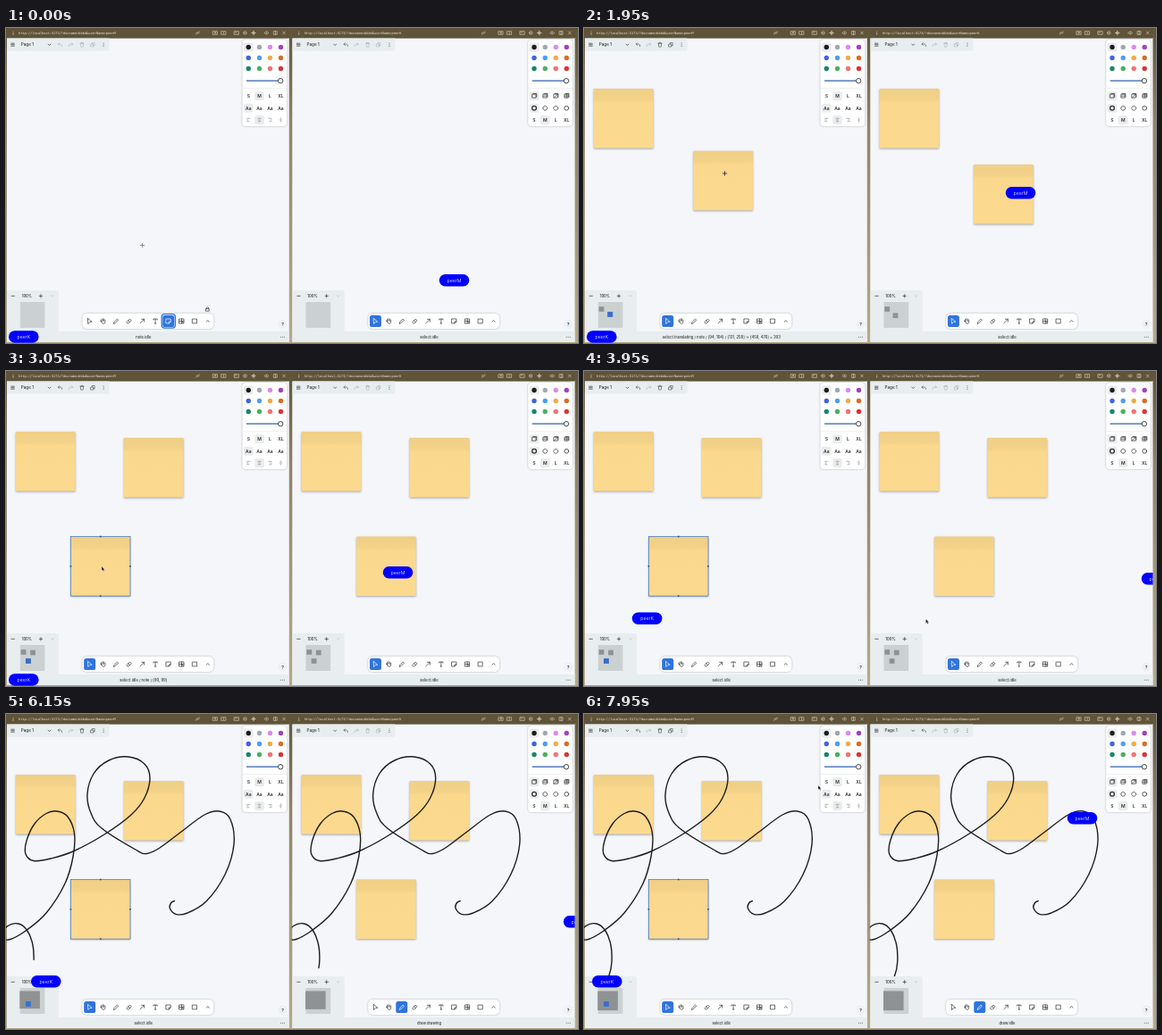
Recreate the animation shown at these times as an HTML page. Size 640x353 px, loop 8000 ms.

```html
<!DOCTYPE html>
<html lang="en">
<head>
<meta charset="utf-8">
<title>Shared whiteboard</title>
<style>
html, body { margin: 0; width: 100%; height: 100%; overflow: hidden; background: #8f8465; }
#stage { display: block; width: 100vw; height: 100vh; }
text { font: 500 4.2px Inter, sans-serif; fill: #333; text-anchor: middle; dominant-baseline: central; }
.url { font: 3.62px "DejaVu Sans Mono", monospace; fill: #eee9da; text-anchor: start; }
.page { font-size: 4.6px; text-anchor: start; }
.size { font-size: 5px; font-weight: 600; }
.name { font-size: 5.3px; font-weight: 300; fill: #fff; }
.icon { fill: none; stroke: #333; stroke-width: .7; stroke-linecap: round; stroke-linejoin: round; }
.bar { stroke: #ddd6c2; stroke-width: .6; }
.soft { stroke: #666; stroke-width: .5; stroke-linecap: butt; }
.undo, .edit { opacity: .75; }
.dim { opacity: .25; }
.on .icon { stroke: #fff; }
.chrome { fill: #e8edef; }
.card { fill: #fff; filter: drop-shadow(0 .6px .8px #0004); }
.help { fill: #eef1f3; }
.chosen { fill: #e9ebed; }
.stroke { fill: none; stroke: #1d1d1d; stroke-width: 1.4; stroke-linecap: round; }
.note { filter: drop-shadow(0 1.5px .8px #0005); }
.frame { fill: none; stroke: #3d74c0; stroke-width: .7; }
</style>
</head>
<body>
<svg id="stage" viewBox="0 0 640 353" preserveAspectRatio="none"></svg>
<script>
const LOOP = 8000, STEP = 50, GAP = 319.7, NOTE = 66.6, PAGE = 2.97;
const POINTER_LAG = 70, NOTE_LAG = 100, STATUS_LAG = 45;
const CLICK = 500, PICK_PEN = 4300, PEN_DOWN = 4790, PEN_TIME = 1430;
const drags = [[1500, 2150], [2300, 2800]];
const grab = [33.1, 32];

// [time, x, y]
const leftKeys = [
  [-120, 176, 305], [-70, 165, 276], [0, 152.5, 243.5], [420, 44, 101.5], [620, 44, 101.5],
  [930, 124, 133], [1050, 124, 133], [1380, 44, 99.5], [1500, 44, 99.5], [1720, 106, 155],
  [1850, 149.5, 185], [1880, 152, 178], [1950, 157.5, 163], [2150, 165, 107], [2300, 165, 107],
  [2800, 105.5, 217.5], [2980, 102, 219], [3050, 107, 219], [3600, 304, 226], [6800, 304, 226],
  [7300, 222, 195], [7650, 195, 140], [7880, 221, 110], [7950, 262, 80], [8020, 290, 62]
];
const rightKeys = [
  [3750, 3, 228], [4150, 122.5, 328], [4350, 122.5, 328], [4750, 188.5, 209.5], [4790, 188.5, 209.5]
];
const exitKeys = [[6220, 22, 303], [6450, 9, 293]];

const inkPoints = [
  [188.5, 209.5], [184.8, 211.5], [183.3, 217.5], [190, 224.3], [203, 223], [224, 210], [245, 180],
  [255, 146], [251, 118], [239, 109], [222, 113], [196, 132], [172, 150], [157.5, 156.5], [145, 152],
  [107, 128], [95, 111], [91, 90], [98, 67], [115, 52], [137, 48], [155, 56], [161, 72], [155, 94],
  [140, 113], [110, 135], [75, 154], [50, 162], [31, 164.5], [22, 157], [23, 142], [32, 123],
  [45, 111.5], [57, 109], [69, 115], [76.5, 134], [75, 160], [66, 190], [45, 223], [22, 243],
  [3, 253], [-5, 248], [2, 237.5], [14, 235], [24, 243], [30, 259], [31, 278], [28, 293], [22, 303]
];

const clamp = (v, lo, hi) => Math.min(hi, Math.max(lo, v));

function slope(keys, i, axis) {
  if (i <= 0 || i >= keys.length - 1) return 0;
  const rate = j => (keys[j + 1][axis] - keys[j][axis]) / (keys[j + 1][0] - keys[j][0]);
  const a = rate(i - 1), b = rate(i);
  return a * b > 0 ? 2 * a * b / (a + b) : 0;
}

// Monotone cubic interpolation, so that pauses stay still
function along(keys, time) {
  const t = clamp(time, keys[0][0], keys[keys.length - 1][0]);
  let i = 0;
  while (i < keys.length - 2 && keys[i + 1][0] <= t) i++;
  const p = keys[i], q = keys[i + 1], span = q[0] - p[0], u = (t - p[0]) / span;
  return [1, 2].map(axis => {
    const ease = u * u * (3 - 2 * u);
    return p[axis] + (q[axis] - p[axis]) * ease
      + span * (u * (1 - u) ** 2 * slope(keys, i, axis) - u * u * (1 - u) * slope(keys, i + 1, axis));
  });
}

function smoothPath(pts) {
  const at = i => pts[clamp(i, 0, pts.length - 1)];
  let d = 'M' + pts[0];
  for (let i = 0; i < pts.length - 1; i++) {
    const [a, b, c, e] = [at(i - 1), at(i), at(i + 1), at(i + 2)];
    d += `C${b.map((v, k) => v + (c[k] - a[k]) / 6)} ${c.map((v, k) => v - (e[k] - b[k]) / 6)} ${c}`;
  }
  return d;
}

const box = (x, y, w, h, r, attrs) => `<rect x="${x}" y="${y}" width="${w}" height="${h}" rx="${r}" ${attrs}/>`;
const label = (x, y, s, cls = '') => `<text x="${x}" y="${y}" class="${cls}">${s}</text>`;
const icon = (x, y, d, cls = '') => `<path class="icon ${cls}" transform="translate(${x} ${y})" d="${d}"/>`;
const ring = r => `M${-r} 0a${r} ${r} 0 1 0 ${2 * r} 0a${r} ${r} 0 1 0 ${-2 * r} 0`;
const square = r => `M${-r} ${-r}h${2 * r}v${2 * r}h${-2 * r}z`;

const cols = [271.3, 283.5, 295.5, 307.5];
const palette = ['#1d1d1d', '#9fa8b2', '#d98af0', '#a23fc4', '#3f62e0', '#4b9ef1', '#f1a94b', '#dd6a26',
  '#16886a', '#4cb05e', '#f07474', '#dc3434'];
const sizes = ['S', 'M', 'L', 'XL'];
const toolIcons = [
  'M-2-3L2.5.8H.3L-1.6 2.8z',
  'M-2 .2L-1 1.8Q0 3 1.4 2.8 2.6 2.4 2.6.6V-1.4M-1.5.6V-2M-.2-.2V-2.8M1.2-.2V-2.4M-2 .2l-.6-.9',
  'M-2.5 2.7l.4-1.7L1.4-2.5l1.2 1.2L-.9 2.2z',
  'M-2.6 1L.8-2.5 2.6-.7-.8 2.6H-1.3zM-1-.7L1 1.2',
  'M-2.3 2.3L2.2-2.2M-.7-2.2H2.2V.7',
  'M-2.2-1.5V-2.4H2.2V-1.5M0-2.4V2.5M-.8 2.5H.8',
  'M-2.5-2.5H2.5V.5L.5 2.5H-2.5zM.5 2.5V.5H2.5',
  'M-2.5-2.5H2.5V2.5H-2.5zM-2.5 0H2.5M0-2.5V2.5M.3.3l2 2',
  square(2.4),
  'M-1.6.7L0-.8 1.6.7'
];
const toolX = i => 93.7 + i * 14.68;

function titleBar(user) {
  const marks = [
    [214.5, 'M-1.8 1.8L1.8-1.8M-2 .4L-.6-1M.6 1L2-.4'], [234, 'M-2.4-1.8H2.4V1.8H-2.4zM-.6-.5V.5H.6V-.5z'],
    [243.5, 'M-2.4-1.8H2.4V1.8H-2.4zM0-.9V.9'], [258, 'M-2.4-1.8H2.4V1.8H-2.4zM-1.5-.6H0'],
    [267.5, ring(1.8) + 'M-.5 0H.5'], [277, ring(1.4) + 'M0-2.4V2.4M-2.4 0H2.4'],
    [291.5, 'M-2.4 0Q0-3 2.4 0 0 3-2.4 0M0-.4V.4'], [301.5, square(1.8) + 'M0-1.8V1.8'],
    [311, 'M-1.5-1.5l3 3M1.5-1.5l-3 3']
  ];
  return box(0, 0, 316.8, 11.6, 0, 'fill="#5f5439"')
    + icon(8, 5.7, 'M0-1.8V-1.7M0-.5V1.8', 'bar')
    + label(14, 5.7, `http://localhost:5173/?docname=bbbd&amp;userName=${user}`, 'url')
    + marks.map(([x, d]) => icon(x, 5.5, d, 'bar')).join('');
}

function stylePanel(rows) {
  const chosen = (c, y) => box(cols[c] - 5.3, y - 5, 10.6, 10, 2, 'class="chosen"');
  const drawRow = {
    size: y => chosen(1, y) + cols.map((x, i) => label(x, y, sizes[i], 'size')).join(''),
    font: y => chosen(0, y) + cols.map(x => label(x, y, 'Aa', 'size')).join(''),
    align: y => chosen(1, y) + ['M-2-1.7H2M-2 0H0M-2 1.7H1', 'M-2-1.7H2M-1 0H1M-1.6 1.7H1.6',
      'M-2-1.7H2M0 0H2M-1 1.7H2', 'M0-2.5V-.8M0 .8V2.5M-1.6 0H1.6'].map((d, i) => icon(cols[i], y, d, 'soft')).join(''),
    fill: y => chosen(0, y) + cols.map((x, i) => icon(x, y, square(2) + 'M-1.2-2.7H2.7V1.2'
      + ['', 'M-2 0H2', 'M-2 2L2-2', 'M-2 0H2M0-2V2'][i])).join(''),
    dash: y => chosen(0, y) + cols.map((x, i) => `<circle class="icon" cx="${x}" cy="${y}" r="2.4" style="stroke-width:${i ? .8 : 1.3};stroke-dasharray:${['none', '1.6 .6', '.5 .8', 'none'][i]}"/>`).join('')
  };
  return box(264.5, 13, 49.6, 97, 4, 'class="card"') + chosen(0, 21.5)
    + palette.map((c, i) => `<circle cx="${cols[i % 4]}" cy="${21.5 + 12 * (i >> 2)}" r="2.7" fill="${c}"/>`).join('')
    + '<path d="M269 59.2H307" stroke="#2f5fae" stroke-width="1.2"/><circle cx="307.2" cy="59.2" r="2.7" fill="#fff" stroke="#333" stroke-width=".9"/>'
    + '<path d="M264.5 67.5H314" stroke="#e6e8ea" stroke-width=".6"/>'
    + rows.map((r, i) => drawRow[r]([76.2, 89.8, 103][i])).join('');
}

function note() {
  const m = NOTE / 2;
  const knobs = [[m, 0], [m, NOTE], [0, m], [NOTE, m]]
    .map(([x, y]) => box(x - .8, y - .8, 1.6, 1.6, 0, 'fill="#2a4d80"')).join('');
  return `<g data-part="note">${box(0, 0, NOTE, NOTE, .6, 'fill="url(#paper)" class="note"')}
    <g data-part="frame">${box(0, 0, NOTE, NOTE, 0, 'class="frame"')}${knobs}</g></g>`;
}

function pane(side, x, user, guest, rows) {
  const minis = [0, 1, 2].map(() => `<rect data-part="mini" width="${NOTE}" height="${NOTE}"/>`).join('');
  const top = [
    [7.5, 'M-1.8-1.5H1.8M-1.8 0H1.8M-1.8 1.5H1.8'], [48.5, 'M-1.4-.6L0 .8 1.4-.6'],
    [60.5, 'M-.8-2L-2.2-.6-.8.8M-2.2-.6H1Q2.4-.4 2.2 1.8', 'undo'],
    [72.5, 'M.8-2L2.2-.6.8.8M2.2-.6H-1Q-2.4-.4-2.2 1.8', 'dim'],
    [85, 'M-2.1-1.5H2.1M-1.6-1.5L-1.3 2.4H1.3L1.6-1.5M-.7-1.6V-2.4H.7V-1.6', 'edit'],
    [97, 'M-2-.6H.9V2.3H-2zM-.8-.7V-2.2H2.2V.9H1', 'edit'],
    [109.2, 'M0-1.8V-1.7M0 0V.1M0 1.8V1.9']
  ];
  return `<svg id="${side}" x="${x}" width="316.8" height="353">
    ${box(side === 'left' ? 1 : .6, 11, 320, 341, 0, 'fill="#f4f6fa"')}
    ${note()}${note()}${note()}
    <path data-part="caret" d="M44 96.8V106" stroke="#a8642a" stroke-width=".8"/>
    <path data-part="ink" class="stroke" d="${inkPath}"/>
    ${titleBar(user)}
    <path class="chrome" d="M1 11.6H115.5V23.5Q115.5 25.8 113 25.8H1z"/>
    ${top.map(([cx, d, cls]) => icon(cx, 18.7, d, cls)).join('')}
    ${label(16.8, 18.7, 'Page 1', 'page')}
    ${stylePanel(rows)}
    <path class="chrome" d="M1 294H56.5Q59 294 59 296.5V340H316.8V351.8H1z"/>
    ${icon(7.7, 300.3, 'M-1.7 0H1.7')}${label(23.3, 300.3, '100%')}
    ${icon(39, 300.3, 'M-1.7 0H1.7M0-1.7V1.7')}${icon(52, 300.3, 'M-1.3-.6L0 .7 1.3-.6', 'dim')}
    ${box(15.8, 307, 27.6, 29, 0, 'fill="#cbd0d1"')}
    <g transform="translate(15.7 306.4) scale(.087 .085)">${minis}<rect data-part="inkbox" fill="#8f9292"/><rect data-part="minisel" width="${NOTE}" height="${NOTE}" fill="#3470cf"/></g>
    ${box(85.5, 320, 146.8, 17, 5, 'class="card"')}
    <rect data-part="focus" x="${toolX(6) - 7.6}" y="320.7" width="15.2" height="15.4" rx="3" fill="#fff" stroke="#2f74dc" stroke-width="1.3"/>
    <rect data-part="active" y="322" width="13" height="13" rx="2.6" fill="#2f74dc"/>
    ${toolIcons.map((d, i) => `<g data-part="tool">${icon(toolX(i), 328.5, d)}</g>`).join('')}
    <path data-part="lock" class="icon" d="M223.8 314.6H227.2V317.2H223.8zM224.5 314.5V313.4Q225.5 311.8 226.5 313.4V314.5"/>
    <circle class="help" cx="309.5" cy="331.8" r="5.2"/>${label(309.5, 332, '?', 'size')}
    ${icon(309.5, 346.3, 'M-2 0H-1.9M0 0H.1M2 0H2.1')}
    <text data-part="status" x="153.8" y="346.3"></text>
    <g data-part="pill">${box(0, 0, 33.6, 13.4, 6.7, 'fill="#00f"')}${label(16.8, 6.8, guest, 'name')}</g>
    <path data-part="cross" d="M-2.6 0H2.6M0-2.6V2.6" stroke="#666" stroke-width=".8"/>
    <path data-part="arrow" d="M0 0V4.7L1.1 3.7 2 5.6 2.9 5.2 2.1 3.4H3.5z" fill="#111" stroke="#fff" stroke-width=".3"/>
  </svg>`;
}

const inkPath = smoothPath(inkPoints);
const stage = document.getElementById('stage');
stage.innerHTML = `<defs>
  <linearGradient id="paper" x2="0" y2="1"><stop stop-color="#f0cf86"/><stop offset=".17" stop-color="#f2d188"/>
    <stop offset=".24" stop-color="#fad88e"/><stop offset="1" stop-color="#fbd98f"/></linearGradient>
  <linearGradient id="desk" x2="0" y2="1"><stop stop-color="#5f5439"/><stop offset=".3" stop-color="#8f8465"/>
    <stop offset="1" stop-color="#b5aa8b"/></linearGradient></defs>
  ${box(0, 0, 640, 353, 0, 'fill="url(#desk)"')}
  ${pane('left', 0, 'peerM', 'peerK', ['size', 'font', 'align'])}
  ${pane('right', GAP, 'peerK', 'peerM', ['fill', 'dash', 'size'])}`;

function parts(side) {
  const root = document.getElementById(side), all = n => [...root.querySelectorAll(`[data-part=${n}]`)];
  const found = { notes: all('note'), frames: all('frame'), minis: all('mini'), tools: all('tool'),
    edits: [...root.querySelectorAll('.edit')], undo: root.querySelector('.undo') };
  for (const n of ['caret', 'ink', 'inkbox', 'minisel', 'focus', 'active', 'lock', 'status', 'pill', 'cross', 'arrow'])
    found[n] = all(n)[0];
  return found;
}
const left = parts('left'), right = parts('right');
const inkLength = left.ink.getTotalLength();
const inkSamples = Array.from({ length: 121 }, (_, i) => left.ink.getPointAtLength(inkLength * i / 120));

const show = (el, on) => { el.style.display = on ? '' : 'none'; };
const move = (el, [x, y]) => el.setAttribute('transform', `translate(${x} ${y})`);

function inkProgress(t) {
  const u = clamp((t - PEN_DOWN) / PEN_TIME, 0, 1);
  return u * u * (3 - 2 * u);
}

function rightCursor(t) {
  if (t < PEN_DOWN) return along(rightKeys, t);
  if (t > PEN_DOWN + PEN_TIME) return along(exitKeys, t);
  const p = left.ink.getPointAtLength(inkLength * inkProgress(t));
  return [p.x, p.y];
}

function notePlaces(t) {
  const dragged = drags.map(([from, to]) => t < from ? null
    : along(leftKeys, Math.min(t, to)).map((v, k) => v - grab[k]));
  return [t < CLICK ? null : [10.9, 68], ...dragged];
}

function drawBoard(p, t, selected, inkTime) {
  const places = notePlaces(t);
  places.forEach((at, i) => {
    for (const el of [p.notes[i], p.minis[i]]) {
      show(el, at);
      if (at) move(el, at);
    }
    show(p.frames[i], false);
    p.minis[i].setAttribute('fill', '#8f9292');
  });
  show(p.minisel, selected >= 0 && places[selected]);
  if (places[selected]) move(p.minisel, places[selected]);

  const done = inkProgress(inkTime);
  show(p.ink, done);
  show(p.inkbox, done);
  p.ink.setAttribute('stroke-dasharray', `${inkLength * done} 9999`);
  if (done) {
    const seen = inkSamples.slice(0, 1 + Math.ceil(120 * done));
    const xs = seen.map(s => s.x), ys = seen.map(s => s.y), x = Math.min(...xs), y = Math.min(...ys);
    const size = { x, y, width: Math.max(...xs) - x, height: Math.max(...ys) - y };
    for (const k in size) p.inkbox.setAttribute(k, size[k]);
  }
  return places;
}

function pickTool(p, index) {
  p.active.setAttribute('x', toolX(index) - 6.5);
  p.tools.forEach((el, i) => el.classList.toggle('on', i === index));
}

function leftStatus(t, cursor, place, dragging) {
  if (t < CLICK) return 'note.idle';
  const page = ([x, y]) => [Math.round(x * PAGE), Math.round((y - 12.5) * PAGE)];
  const pair = p => `[${p[0]}, ${p[1]}]`;
  const inside = cursor.map((v, k) => Math.round((v - place[k]) * PAGE));
  const editing = t < drags[0][0];
  if (editing || dragging) {
    const from = page(along(leftKeys, editing ? CLICK : dragging[0])), to = page(cursor);
    const far = Math.round(Math.hypot(to[0] - from[0], to[1] - from[1]));
    return `select.${editing ? 'editing_shape' : 'translating'} / note / ${pair(inside)} / ${pair(from)} → ${pair(to)} = ${far}`;
  }
  return inside.every(v => v >= 0 && v <= 200) ? `select.idle / note / ${pair(inside)}` : 'select.idle';
}

function render(t) {
  const cursor = along(leftKeys, t), dragging = drags.find(([a, b]) => t >= a && t < b);
  const selected = t < CLICK ? -1 : t < drags[0][0] ? 0 : t < drags[1][0] ? 1 : 2;
  const places = drawBoard(left, dragging ? Math.max(t - 30, dragging[0]) : t, selected, t - 80);
  drawBoard(right, t - NOTE_LAG, -1, t - 55);

  const editing = selected === 0, started = t >= CLICK;
  if (selected >= 0) {
    show(left.frames[selected], !dragging);
    left.frames[selected].firstChild.style.stroke = editing ? '#555' : '';
  }
  show(left.caret, editing);
  show(right.caret, false);
  show(left.focus, !started);
  show(left.lock, !started);
  show(right.focus, false);
  show(right.lock, false);
  left.undo.classList.toggle('dim', !started);
  left.edits.forEach(el => el.classList.toggle('dim', !started));
  right.edits.forEach(el => el.classList.add('dim'));

  const pen = t >= PICK_PEN;
  pickTool(left, started ? 0 : 6);
  pickTool(right, pen ? 2 : 0);
  left.status.textContent = leftStatus(t, along(leftKeys, t - STATUS_LAG), places[selected], dragging);
  right.status.textContent = !pen ? 'select.idle'
    : t >= PEN_DOWN && t <= PEN_DOWN + PEN_TIME ? 'draw.drawing' : 'draw.idle';

  const onLeft = t < 3620 || t > 6800, cross = !started || dragging;
  show(left.cross, onLeft && cross);
  show(left.arrow, onLeft && !cross);
  left.cross.setAttribute('stroke', dragging ? '#222' : '#777');
  move(left.cross, cursor);
  move(left.arrow, cursor);

  const onRight = t >= 3750 && t < 6100, pointer = rightCursor(t);
  show(right.cross, onRight && pen);
  show(right.arrow, onRight && !pen);
  move(right.cross, pointer);
  move(right.arrow, pointer);

  move(right.pill, along(leftKeys, t - POINTER_LAG));
  move(left.pill, t < 3800 ? [3, 339.3] : rightCursor(t - 20));
}

function tick() {
  render(Math.floor(performance.now() % LOOP / STEP) * STEP);
  requestAnimationFrame(tick);
}
tick();
</script>
</body>
</html>
```
